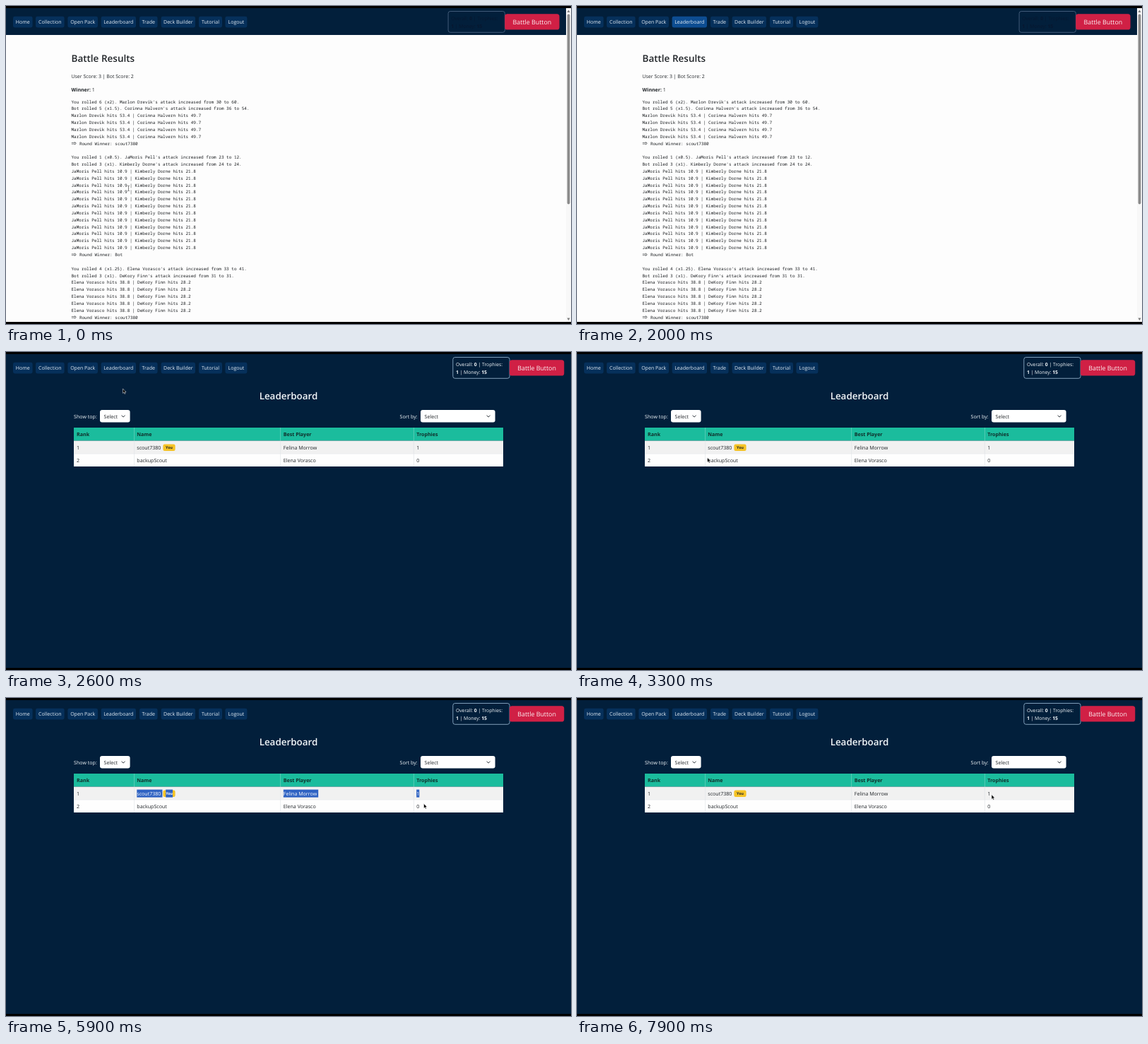
An HTML page that plays this animation: 800x450 px, repeating every 8 s.

```html
<!DOCTYPE html>
<html lang="en">
<head>
<meta charset="utf-8">
<title>Card battle</title>
<style>
  html, body { margin: 0; width: 100%; height: 100%; overflow: hidden; background: #000; }
  svg { display: block; width: 800px; height: 450px; }
  text { font-family: "Open Sans", "Noto Sans", sans-serif; white-space: pre; text-rendering: geometricPrecision; }
  .log { font-family: "Noto Sans Mono", "DejaVu Sans Mono", monospace; }
  .b { font-weight: 700; }
</style>
</head>
<body>
<svg id="stage" viewBox="0 0 800 450"></svg>
<script>
const LOOP = 8000, STEP = 100;
const PAGE_CUT = 2100, DRAG_START = 4100, DRAG_CLEAR = 6300;
const NAVY = '#021f3b', INK = '#212529', WHITE = '#f4f7fa', BLUE = '#2f63c3';
const stage = document.getElementById('stage');

function add(parent, tag, attrs, content) {
  const el = document.createElementNS('http://www.w3.org/2000/svg', tag);
  for (const k in attrs) el.setAttribute(k, attrs[k]);
  if (content !== undefined) el.textContent = content;
  parent.appendChild(el);
  return el;
}
const group = (parent = stage) => add(parent, 'g', {});
const box = (p, x, y, x2, y2, fill, r = 0, more = {}) =>
  add(p, 'rect', { x, y, width: x2 - x, height: y2 - y, fill, rx: r, ...more });
const label = (p, x, y, s, size, fill, more = {}) =>
  add(p, 'text', { x, y, 'font-size': size, fill, ...more }, s);
const line = (p, d, stroke, width) =>
  add(p, 'path', { d, stroke, fill: 'none', 'stroke-width': width });

// Text made of alternating regular and bold runs
function runs(p, x, y, parts, size, fill) {
  const t = label(p, x, y, '', size, fill);
  parts.forEach((s, i) => add(t, 'tspan', i % 2 ? { class: 'b' } : {}, s));
}

function statsAndButton(p, x, border, ink) {
  box(p, x + .5, 7.5, x + 80.8, 37.3, 'none', 3, { stroke: border, 'stroke-width': .9 });
  runs(p, x + 4.6, 19.5, ['Overall: ', '0', ' | Trophies:'], 6.8, ink);
  runs(p, x + 4.6, 31, ['', '1', ' | Money: ', '15'], 6.8, ink);
  box(p, x + 80.6, 11.2, x + 158, 33.6, '#d02045', 3.6);
  label(p, x + 119.3, 25.9, 'Battle Button', 8.85, '#fbeef1', { 'text-anchor': 'middle' });
}

// Results page
const results = group();
box(results, 0, 3, 793, 447, '#fdfdfd');
box(results, 0, 3, 793, 41, NAVY);
box(results, 793, 3, 800, 447, '#f8f8f8');
box(results, 794.6, 11.5, 798.4, 280.5, '#8b8b8b', 1.9);
add(results, 'path', { d: 'M794.4 9l2.1-3.4 2.1 3.4zM794.4 441.6l2.1 3.4 2.1-3.4z', fill: '#7d7d7d' });
statsAndButton(results, 625.6, '#4a6380', '#08172f');
label(results, 92.5, 78.6, 'Battle Results', 13.5, INK, { 'font-weight': 600 });
label(results, 92.5, 102, 'User Score: 3 | Bot Score: 2', 6.95, INK);
runs(results, 92.5, 121, ['', 'Winner:', ' 1'], 7, INK);

const rounds = [
  { you: 'Marlon Drevik', bot: 'Corinna Halvern', roll: ['6 (x2)', '5 (x1.5)'],
    from: [30, 36], to: [60, 54], hit: ['53.4', '49.7'], n: 4, winner: 'scout7380' },
  { you: 'JaMoris Pell', bot: 'Kimberly Dorne', roll: ['1 (x0.5)', '3 (x1)'],
    from: [23, 24], to: [12, 24], hit: ['10.9', '21.8'], n: 12, winner: 'Bot' },
  { you: 'Elena Vorasco', bot: 'DeKory Finn', roll: ['4 (x1.25)', '3 (x1)'],
    from: [33, 31], to: [41, 31], hit: ['38.8', '28.2'], n: 5, winner: 'scout7380' }
];
let logY = 137.5;
function log(s, x = 92.5) {
  label(results, x, logY, s, 6, '#1b1e21', { class: 'log' });
  logY += 9.84;
}
for (const r of rounds) {
  ['You', 'Bot'].forEach((who, i) =>
    log(`${who} rolled ${r.roll[i]}. ${[r.you, r.bot][i]}'s attack increased from ${r.from[i]} to ${r.to[i]}.`));
  for (let i = 0; i < r.n; i++) log(`${r.you} hits ${r.hit[0]} | ${r.bot} hits ${r.hit[1]}`);
  const y = logY - 2.2;
  line(results, `M92.8 ${y - .9}h5.4M92.8 ${y + .9}h5.4M97 ${y - 2.1}l2.4 2.1-2.4 2.1`, '#1b1e21', .55);
  log(`Round Winner: ${r.winner}`, 103.9);
  logY += 9.84;
}

// Leaderboard page
const board = group();
box(board, 0, 3, 800, 447, NAVY);
statsAndButton(board, 632.3, '#8eabc6', WHITE);
label(board, 400, 67.3, 'Leaderboard', 13.4, WHITE, { 'text-anchor': 'middle', 'font-weight': 600 });
for (const [s, x, left, right] of [['Show top:', 96, 133, 175.6], ['Sort by:', 557.6, 587, 692.6]]) {
  label(board, x, 93.8, s, 7.1, WHITE);
  box(board, left, 82, right, 99.6, '#fff', 3);
  label(board, left + 5.6, 93.8, 'Select', 7.1, INK);
  line(board, `M${right - 12} 89.6l2.5 2.5 2.5-2.5`, '#343a40', 1);
}
box(board, 96, 107, 704, 125.6, '#1bbc9d');
box(board, 96, 125.6, 704, 144, '#f1f1f1');
box(board, 96, 144, 704, 162, '#fefefe');
line(board, 'M96 144H704', '#dee2e6', .5);
line(board, 'M181.6 107V125.6M388.6 107V125.6M577.4 107V125.6', '#7fd6c4', .6);
line(board, 'M181.6 125.6V162M388.6 125.6V162M577.4 125.6V162', '#dfe3e6', .6);

const cols = [100, 185.3, 392.8, 581.2];
const rows = [
  [119.4, 'Rank', 'Name', 'Best Player', 'Trophies'],
  [137.8, '1', 'scout7380', 'Felina Morrow', '1'],
  [156.2, '2', 'backupScout', 'Elena Vorasco', '0']
];
rows.forEach(([y, ...cells], r) => cells.forEach((s, c) =>
  label(board, cols[c], y, s, 7.1, r ? INK : '#10302c', r ? {} : { class: 'b' })));
box(board, 222.4, 130.4, 239.6, 140, '#f5c325', 2.3);
label(board, 231, 137.3, 'You', 5.3, INK, { class: 'b', 'text-anchor': 'middle' });

// Text selection over the first row
const picks = [[185.3, 'scout7380', 7.1], [226.2, 'You', 5.3], [392.8, 'Felina Morrow', 7.1], [581.2, '1', 7.1]]
  .map(([x, s, size]) => {
    const bold = s === 'You';
    return {
      x, s, bold,
      back: box(board, x, 129.6, x, 140.6, BLUE),
      text: label(board, x, bold ? 137.3 : 137.8, '', size, '#fff', bold ? { class: 'b' } : {})
    };
  });

function select(cx) {
  for (const p of picks) {
    const n = Math.max(0, Math.min(p.s.length, Math.round((cx - p.x) / 3.8)));
    p.text.textContent = p.s.slice(0, n);
    const tail = n === p.s.length && !p.bold && p.s !== '1' ? 2 : 0;
    p.back.setAttribute('width', n ? p.text.getComputedTextLength() + tail : 0);
  }
}

// Navigation shared by both pages
const nav = group();
const tabs = [['Home', 10, 37.6], ['Collection', 42, 82.6], ['Open Pack', 87.4, 130], ['Leaderboard', 134.6, 184],
  ['Trade', 189, 214.6], ['Deck Builder', 219.6, 268], ['Tutorial', 273, 306], ['Logout', 310.4, 341.4]]
  .map(([s, x, x2]) => {
    const back = box(nav, x, 14.8, x2, 30.4, '#06305b', 2.4);
    label(nav, (x + x2) / 2, 25.3, s, 7.05, '#e4ecf4', { 'text-anchor': 'middle' });
    return { x, x2, back };
  });

// Pointers
const arrow = add(stage, 'path', {
  d: 'M0 0V6.4L1.5 5.1 2.5 7.4 3.6 6.9 2.6 4.7H4.6Z', fill: '#000', stroke: '#fff', 'stroke-width': .5
});
const beam = line(stage, 'M-1.3-3.7Q0-3.7 0-3Q0-3.7 1.3-3.7M0-3V3M-1.3 3.7Q0 3.7 0 3Q0 3.7 1.3 3.7', '#333', .6);

const path = [
  [0, 173.5, 258], [100, 173.5, 258], [1400, 160, 24], [2400, 160, 24], [3300, 184.5, 149.6],
  [3600, 184, 132], [4100, 184, 132], [4600, 337, 132.6], [5000, 440, 133], [5500, 584, 131],
  [5600, 584, 131], [5800, 595, 142], [5900, 591.6, 149.6], [6000, 591.6, 149.6], [6500, 583, 134],
  [6600, 583, 134], [6700, 579, 128], [6900, 590, 134], [7000, 590, 134], [7900, 587, 136.8], [8000, 587, 136.8]
];
function pointerAt(t) {
  const i = path.findIndex((k, n) => n && t <= k[0]);
  const a = path[i - 1], b = path[i], f = (t - a[0]) / (b[0] - a[0]);
  return [a[1] + (b[1] - a[1]) * f, a[2] + (b[2] - a[2]) * f];
}

const show = (el, on) => el.setAttribute('visibility', on ? 'visible' : 'hidden');

function draw(time) {
  const t = Math.floor(time % LOOP / STEP) * STEP;
  const onBoard = t >= PAGE_CUT;
  const [x, y] = pointerAt(t);
  show(results, !onBoard);
  show(board, onBoard);
  select(t >= DRAG_START && t < DRAG_CLEAR ? x : 0);

  for (const tab of tabs) {
    const hover = x > tab.x && x < tab.x2 && y > 14 && y < 31;
    tab.back.setAttribute('fill', hover ? '#0d4d92' : '#06305b');
  }
  const overText = !onBoard && y > 130;
  for (const el of [arrow, beam]) el.setAttribute('transform', `translate(${x} ${y})`);
  show(beam, overText);
  show(arrow, !overText && y > 41);
}

const start = performance.now();
function tick() {
  draw(performance.now() - start);
  requestAnimationFrame(tick);
}
tick();
</script>
</body>
</html>
```
